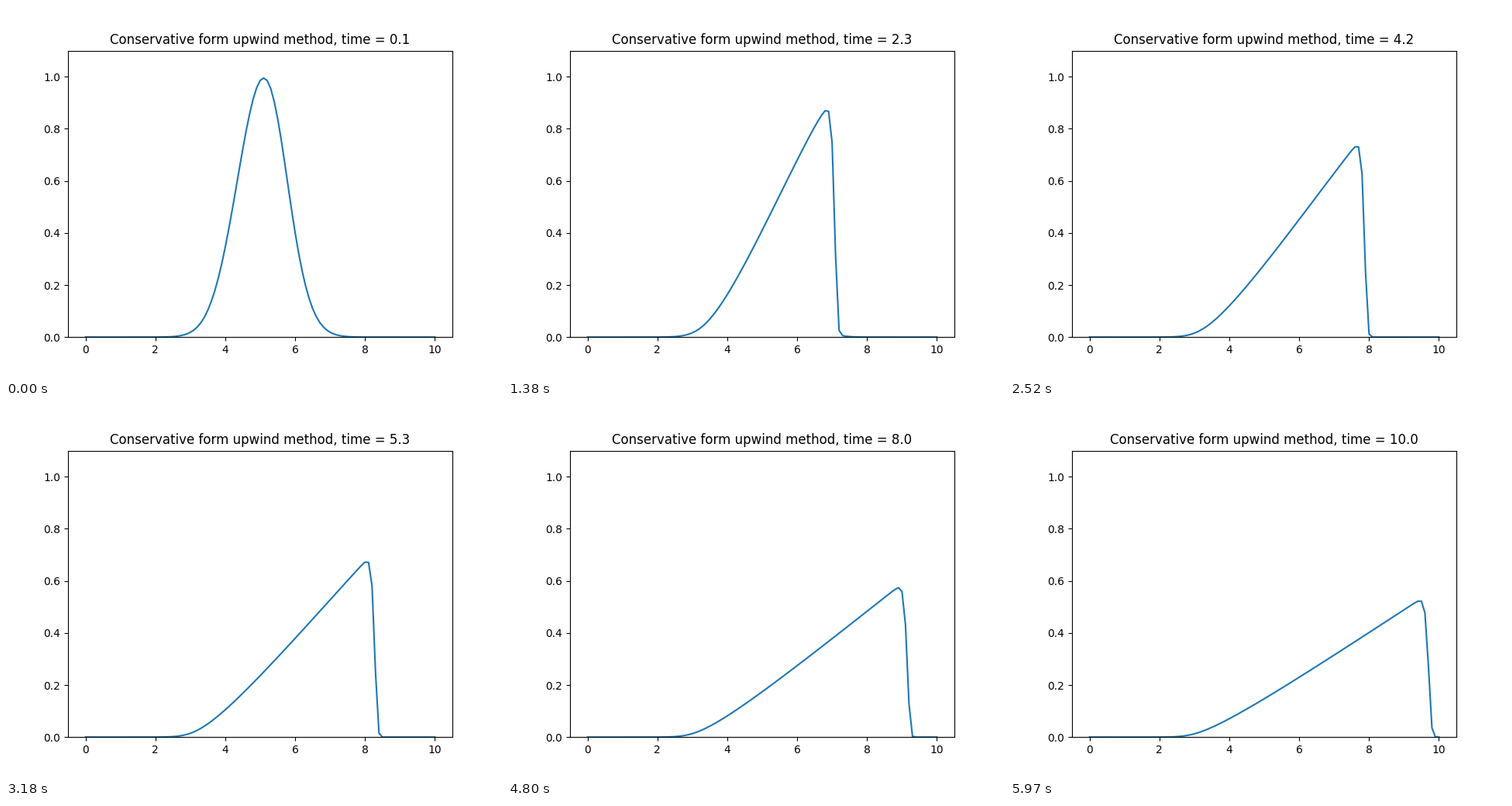
Write a matplotlib script that moves like this. It is 640 px wide and 480 px high and loops after 6 s.

```python
import numpy as np
import matplotlib.pyplot as plt
from matplotlib.animation import FuncAnimation

FRAMES = 200
DT, DX = 0.05, 0.1


def step(u):
    """One conservative upwind step of the inviscid Burgers equation."""
    flux = u**2 / 2
    new = u.copy()
    new[1:] -= DT / DX * (flux[1:] - flux[:-1])
    return new


x = np.linspace(0, 10, 101)
u = step(np.exp(-(x - 5) ** 2))

# Time is summed step by step so the rounded label follows the running total.
waves, times = [], []
t = 0.0
for _ in range(FRAMES):
    u = step(u)
    t += DT
    waves.append(u)
    times.append(t)

fig, ax = plt.subplots(figsize=(6.4, 4.8), dpi=100)
line, = ax.plot(x, waves[0])
ax.set_ylim(0, 1.1)
title = ax.set_title("")


def update(i):
    line.set_ydata(waves[i])
    title.set_text(f"Conservative form upwind method, time = {times[i]:.1f}")
    return line, title


anim = FuncAnimation(fig, update, frames=FRAMES, interval=30,
                     repeat=True, repeat_delay=0, blit=False)
plt.show()
```
